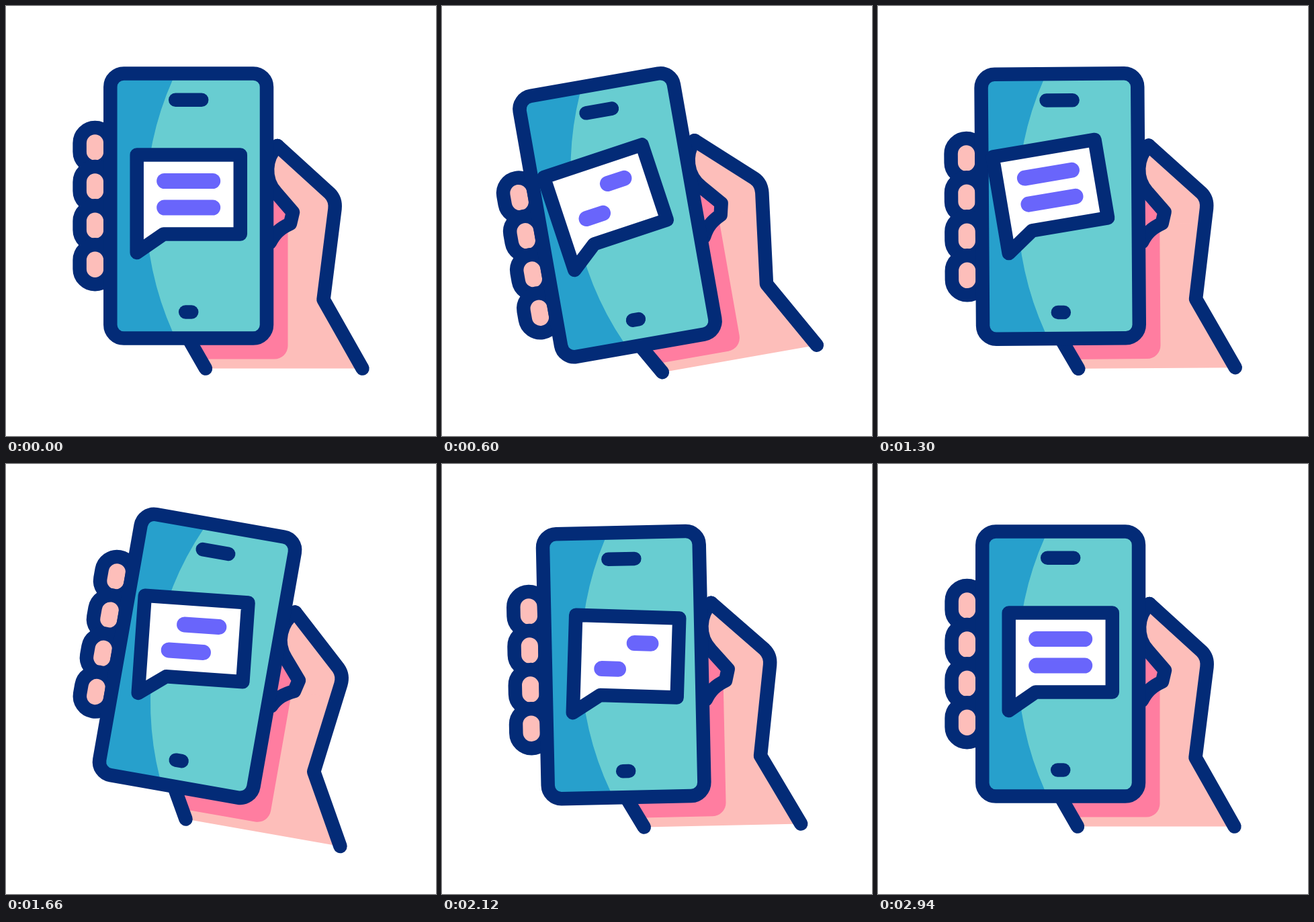
Animation of 640 by 640 pixels, one loop 3.6 s. Source, as an HTML page with a canvas:

```html
<!DOCTYPE html>
<html lang="en">
<head>
<meta charset="utf-8">
<title>Phone in hand</title>
<style>
html, body { margin: 0; width: 100%; height: 100%; overflow: hidden; background: #fff; }
canvas { display: block; width: 100vw; height: 100vh; }
</style>
</head>
<body>
<canvas id="stage" width="640" height="640"></canvas>
<script>
const ctx = document.getElementById('stage').getContext('2d');
const LOOP = 3600;
const NAVY = '#032b77', SKIN = '#fdbeba', SHADE = '#ff7da0', TEAL = '#68cdd1',
      BLUE = '#27a0cc', PURPLE = '#6965fb', YELLOW = '#ffca4f';
const STROKE = 20.5;

// Tracks: [time, value] pairs, eased in and out between neighbours
const tilt = [[0, 0], [618, -10], [965, -10], [1655, 10], [1960, -4.9], [2270, 2], [2580, -1.8], [2890, 0]];
const slide = [[0, 0], [618, 36], [965, 36], [1655, -8.8], [1960, 12], [2270, -2.5], [2580, 0]];
const sway = [[0, 0], [960, -12.1], [1660, -6], [2115, 3], [2415, -4], [2680, 1], [2890, 0]];
const dash = [[0, 72], [515, 24], [1210, 72], [2200, 24], [2760, 72]];
const flash = [[2240, 0], [2340, 1], [2500, 1], [2600, 0]];

function at(track, t) {
  if (t <= track[0][0]) return track[0][1];
  for (let i = 1; i < track.length; i++) {
    const [t0, a] = track[i - 1], [t1, b] = track[i];
    if (t < t1) return a + (b - a) * (1 - Math.cos(Math.PI * (t - t0) / (t1 - t0))) / 2;
  }
  return track[track.length - 1][1];
}

function spin(x, y, deg) {
  ctx.translate(x, y);
  ctx.rotate(deg * Math.PI / 180);
  ctx.translate(-x, -y);
}

function shape(path, fill, stroke, width = STROKE) {
  if (fill) { ctx.fillStyle = fill; ctx.fill(path); }
  if (stroke) { ctx.strokeStyle = stroke; ctx.lineWidth = width; ctx.stroke(path); }
}

function box(x0, y0, x1, y1, r) {
  const p = new Path2D();
  p.roundRect(x0, y0, x1 - x0, y1 - y0, r);
  return p;
}

function bar(x0, x1, y, color, width) {
  shape(new Path2D(`M${x0} ${y}H${x1}`), null, color, width);
}

const thumb = 'M404 208C386 226 383 257 402 278L427 307L423 324';
const palmEdge = 'L482 279Q491 288 489.5 302L472.5 437L530.5 539.5';
const palm = new Path2D('M404 208' + palmEdge + 'H297L270 492L300 300Z');
const shadow = box(285, 240, 419.5, 525.5, [0, 0, 20, 0]);
const thumbFill = new Path2D(thumb + 'L480 324L489 300Q491 288 482 279Z');
const thumbLine = new Path2D(thumb + 'C408 331 400 338 393 352');
const palmLine = new Path2D('M404 208' + palmEdge);
const wrist = new Path2D('M268 489L297 539.5');
const screen = box(155.3, 100.5, 388, 494.5, 20);
const sheen = new Path2D('M160 110H248A461 461 0 0 0 248 485H160Z');
const bubble = new Path2D('M194.7 221.5H348.8V339.5H234.5L194.7 367Z');

function drawHand(shift) {
  shape(palm, SKIN);
  shape(shadow, SHADE);
  shape(thumbFill, SKIN);
  shape(thumbLine, null, NAVY);
  shape(palmLine, null, NAVY);
  shape(wrist, null, NAVY);
  for (let i = 0; i < 4; i++) {
    const y = 210.5 + i * 58.1 + shift;
    shape(box(109.6, y - 29.5, 155.4, y + 29.5, 22.9), SKIN, NAVY);
  }
}

function drawPhone(lit) {
  shape(screen, TEAL);
  ctx.save();
  ctx.clip(screen);
  shape(sheen, BLUE);
  ctx.restore();
  shape(screen, null, NAVY);
  const mix = (a, b) => Math.round(a + (b - a) * lit);
  const color = `rgb(${mix(3, 255)},${mix(43, 255)},${mix(119, 255)})`;
  const width = STROKE + 2.8 * lit;
  bar(252.2, 291.2, 139.8, color, width);
  bar(267.2, 276.2, 455.5, color, width);
}

function drawWaves(lit) {
  if (!lit) return;
  ctx.save();
  ctx.globalAlpha = lit;
  for (const [r, from, to] of [[21.3, -94, -7], [46.3, -84, -14]]) {
    const p = new Path2D();
    p.arc(328, 223.3, r, from * Math.PI / 180, to * Math.PI / 180);
    shape(p, null, YELLOW, 21);
  }
  ctx.restore();
}

function drawBubble(angle, len) {
  ctx.save();
  spin(194.7, 367, angle);
  shape(bubble, '#fff', NAVY);
  bar(307.7 - len, 307.7, 260.5, PURPLE, 23);
  bar(235.7, 235.7 + len, 300, PURPLE, 23);
  ctx.restore();
}

function draw(t) {
  const lit = at(flash, t);
  ctx.fillStyle = '#fff';
  ctx.fillRect(0, 0, 640, 640);
  ctx.lineCap = ctx.lineJoin = 'round';
  ctx.save();
  spin(345, 365.4, at(tilt, t));
  drawHand(at(slide, t));
  drawPhone(lit);
  drawWaves(lit);
  drawBubble(at(sway, t), at(dash, t));
  ctx.restore();
}

function frame() {
  draw(performance.now() % LOOP);
  requestAnimationFrame(frame);
}
frame();
</script>
</body>
</html>
```
